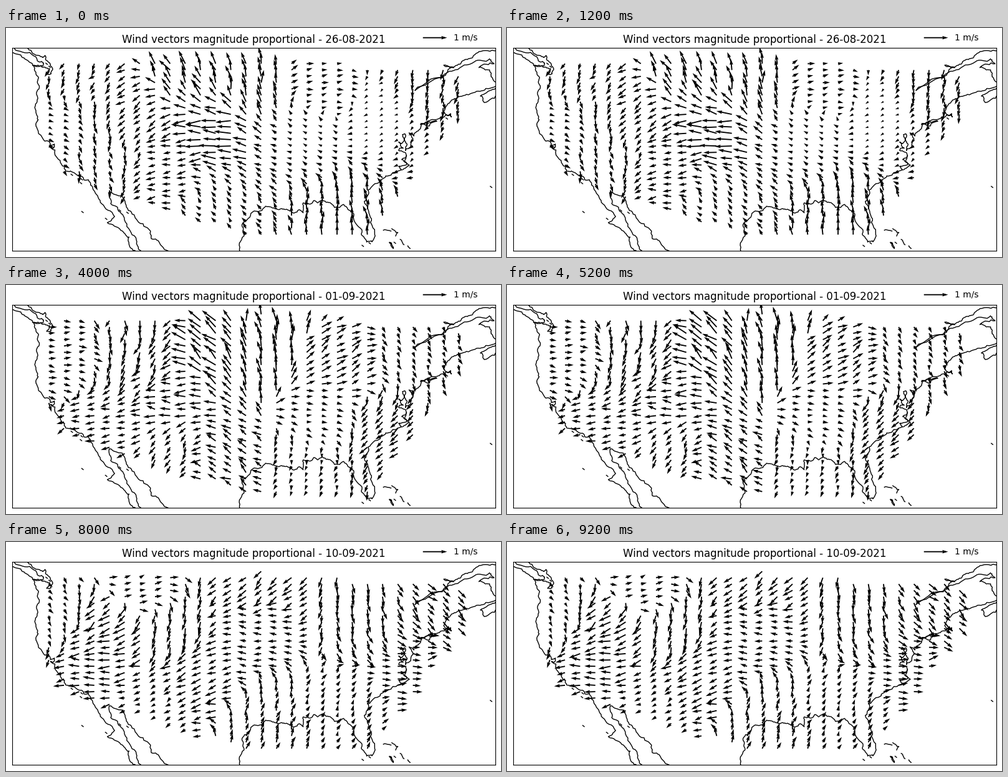
These frames come from a looping animation (794 px wide and 369 px high, 10000 ms). A matplotlib script:

```python
import numpy as np
import matplotlib.pyplot as plt
from matplotlib.animation import FuncAnimation

W, H, DPI = 794, 369, 100
LEFT, BOTTOM, WIDTH, HEIGHT = 10, 10, 775, 327   # map area in pixels
DEG = 12.25                                      # pixels per degree
WEST, SOUTH = 127.5, 24.0                        # lower left corner of the map
DX, DY = 24.33, 10.2                             # arrow spacing in pixels
KEY_PX = WIDTH / 20                              # length of 1 m/s

# Key points of the shores as (degrees west, degrees north)
SHORES = [
    # Vancouver Island
    [(127.6, 50.1), (126.1, 49.4), (125.1, 48.75), (123.5, 48.32), (123.4, 48.7),
     (124.3, 49.3), (125.2, 50.1), (127.6, 50.7)],
    # Strait of Georgia and Puget Sound
    [(125.6, 50.8), (124.7, 49.9), (123.5, 49.42), (123.2, 49.7), (123.1, 49.1),
     (122.5, 48.5), (122.2, 47.95), (122.4, 47.3), (123, 47.2), (122.6, 47.95),
     (123.2, 48.15), (124.7, 48.4)],
    # Pacific
    [(124.7, 48.4), (124.15, 46.95), (123.95, 45.5), (124.15, 44), (124.55, 42.85),
     (124.1, 41.2), (124.4, 40.4), (123.75, 39.2), (122.5, 37.85), (122, 38.05),
     (122.1, 37.5), (122.5, 37.6), (121.9, 36.6), (120.65, 35.1), (120.5, 34.5),
     (119.3, 34.2), (118.4, 33.8), (117.3, 33.0), (116.7, 31.8), (115.8, 30.2),
     (114.1, 28.5), (115.05, 27.7), (113.3, 26.7), (112.2, 25.8), (112.1, 24.5),
     (111.3, 23.9)],
    # Gulf of California
    [(110.55, 23.9), (111.3, 25.7), (112.7, 27.8), (113.2, 28.85), (114.6, 30.2),
     (114.8, 31.75), (113.1, 31.2), (112.3, 29.3), (111.1, 27.95), (109.4, 26.6),
     (109.3, 25.6), (108.1, 24.8), (106.9, 23.9)],
    # Gulf of Mexico
    [(97.7, 23.9), (97.15, 25.95), (97.4, 27.2), (96.4, 28.4), (94.8, 29.3),
     (93.6, 29.75), (92.2, 29.55), (91.2, 29.25), (90.2, 29.1), (89.9, 29.4),
     (89.4, 29), (89.4, 29.8), (89.4, 30.3), (88.2, 30.3), (88.05, 30.6),
     (87.5, 30.3), (86.2, 30.4), (85.3, 29.7), (84.1, 30.1), (82.8, 28.9),
     (82.7, 27.9), (81.8, 26.2), (81.1, 25.15), (80.4, 25.2)],
    # Florida to the Chesapeake
    [(80.4, 25.2), (80.05, 26.8), (80.6, 28.4), (81.4, 30.5), (80.9, 32),
     (79.3, 33.1), (78.6, 33.85), (77.9, 33.95), (76.5, 34.65), (76.9, 35.1),
     (75.8, 35.4), (76.5, 36), (75.95, 36.2), (76, 36.9), (76.9, 37.2),
     (76.3, 37.5), (76.9, 38.3), (76.4, 38.2), (76.4, 39.3), (76.1, 39.4),
     (76.2, 38.6), (75.8, 38), (76, 37.2)],
    [(76.4, 34.65), (75.5, 35.25), (75.9, 36.5)],
    # Delaware to Fundy
    [(76, 37.2), (75.05, 38.5), (75.55, 39.5), (74.9, 39.1), (74, 40.2),
     (74, 40.75), (72.5, 41.27), (71.3, 41.6), (70, 41.6), (70.1, 42.05),
     (70.5, 41.8), (71, 42.3), (70.7, 43), (70, 43.8), (68.9, 44.3),
     (67.1, 44.8), (65.5, 45.35), (64.1, 45.75)],
    # Nova Scotia, St Lawrence, Long Island
    [(64.1, 45.35), (65, 45.05), (66.2, 44.35), (65.7, 43.5), (64.1, 44.5)],
    [(74.75, 45.1), (71.2, 46.85), (69.7, 48.1), (71, 48.42), (69.7, 48.15),
     (68.5, 49), (67.3, 49.35), (66.4, 50.2), (64.1, 50.3)],
    [(74.75, 45.1), (71.2, 46.75), (69.5, 47.8), (67, 48.85), (65, 49.25),
     (64.4, 48.6), (66.4, 48.1), (65, 47.8), (64.8, 46.9), (64.1, 46.2)],
    [(74, 40.6), (71.9, 41.05), (72.6, 40.95), (74, 40.6)],
    # Bahamas
    [(78.9, 26.7), (77.9, 26.6)],
    [(77.8, 26.9), (77, 26.4), (77.3, 25.95)],
    [(78.1, 25.1), (77.6, 24.3), (78.1, 25.1)],
    [(76.7, 25.5), (76.2, 24.8)],
    [(75.7, 24.65), (75.4, 24.3)]]

# Small islands, each a short stroke
ISLETS = [(64.8, 32.4), (118.3, 29.1), (115.2, 28.2), (113.4, 29.3), (112.4, 29),
          (119.7, 34), (118.4, 33.4), (118.5, 32.9), (122.6, 48.2), (123, 48.6),
          (70.6, 41.4), (81.6, 24.65), (80.7, 25), (77.4, 25.05)]

# Wind at a few stations: column, row, heading in degrees, length in pixels
DAYS = {
    "26-08-2021": [
        (1, 2, -115, 13), (0, 11, -25, 9), (4, 15, -80, 13), (6, 10, -140, 15),
        (9, 2, 112, 22), (13, 4, 105, 20), (11, 12, 178, 25), (8, 17, 190, 14),
        (18, 5, 5, 10), (17, 13, 150, 8), (22, 9, -150, 6), (25, 4, -98, 15),
        (11, 24, 125, 11), (19, 25, 90, 17)],
    "29-08-2021": [
        (0, 4, -25, 10), (3, 10, 20, 7), (5, 16, 175, 10), (7, 4, -155, 12),
        (8, 12, 110, 14), (13, 3, -78, 21), (18, 4, -132, 22), (24, 3, 185, 13),
        (22, 11, -140, 9), (13, 14, 145, 11), (17, 21, 118, 22),
        (15, 26, 168, 22), (21, 25, 100, 15), (26, 12, 0, 9)],
    "01-09-2021": [
        (1, 5, 0, 12), (5, 2, -88, 16), (6, 8, -115, 17), (4, 18, 190, 14),
        (8, 21, -120, 14), (8, 14, 175, 18), (11, 5, 140, 25), (14, 6, 100, 22),
        (12, 24, 140, 17), (19, 8, 28, 17), (24, 5, -65, 11), (18, 16, -15, 10),
        (22, 18, -135, 17), (17, 24, -110, 9)],
    "04-09-2021": [
        (1, 4, -110, 10), (0, 15, -50, 10), (3, 11, 125, 8), (7, 7, -92, 21),
        (12, 3, -78, 19), (14, 10, -35, 14), (19, 5, 188, 18), (21, 12, 165, 8),
        (25, 5, -60, 14), (11, 16, 180, 15), (6, 21, -95, 14), (11, 25, 143, 22),
        (18, 22, 120, 8), (22, 22, 65, 10)],
    "10-09-2021": [
        (0, 5, -60, 9), (6, 2, 20, 11), (4, 8, -150, 20), (4, 14, 175, 18),
        (8, 9, -100, 17), (14, 2, -135, 18), (14, 9, 170, 13), (21, 7, -80, 16),
        (25, 6, -45, 17), (24, 15, 0, 15), (10, 17, 205, 17), (7, 22, 210, 10),
        (14, 25, 75, 14), (19, 22, 60, 10)]}

rng = np.random.default_rng(4)


def roughen(points, levels=3, amount=0.11):
    """Break every segment at a randomly displaced midpoint, repeatedly."""
    p = np.array(points, float)
    for _ in range(levels):
        step = np.diff(p, axis=0)
        side = step[:, ::-1] * (-1, 1)
        out = np.empty((2 * len(p) - 1, 2))
        out[::2] = p
        out[1::2] = p[:-1] + step / 2 + side * rng.normal(0, amount, (len(step), 1))
        p = out
    return p


def to_px(points):
    lon, lat = np.array(points).T
    return (WEST - lon) * DEG, (lat - SOUTH) * DEG


def grid():
    """Columns and rows of the arrows inside the country's outline."""
    c = np.arange(28)
    first = np.interp(c, [0, 1, 13, 14, 15, 19, 20, 26, 27], [2, 1, 1, 0, 1, 1, 2, 2, 3])
    last = np.interp(c, [0, 1, 9, 13, 21, 22, 27], [14, 18, 25, 28, 28, 25, 9])
    col, row = np.meshgrid(c, np.arange(29), indexing="ij")
    inside = (row >= first[:, None]) & (row <= last[:, None].round())
    return col[inside], row[inside]


def blow(stations):
    """Blend heading and length of the stations by distance, with some gusts."""
    c, r, heading, length = np.array(stations, float).T
    d2 = (col[:, None] - c) ** 2 + ((row[:, None] - r) * DY / DX) ** 2
    weight = (d2 + 0.8) ** -2
    weight /= weight.sum(axis=1, keepdims=True)
    angle = np.angle(weight @ np.exp(1j * np.radians(heading)))
    angle += rng.normal(0, 0.18, len(col))
    speed = weight @ length * rng.uniform(0.8, 1.15, len(col)) / KEY_PX
    return speed * np.cos(angle), speed * np.sin(angle)


fig = plt.figure(figsize=(W / DPI, H / DPI), dpi=DPI, facecolor="white")
ax = fig.add_axes([LEFT / W, BOTTOM / H, WIDTH / W, HEIGHT / H])
ax.set(xlim=(0, WIDTH), ylim=(0, HEIGHT), xticks=[], yticks=[])

for shore in SHORES:
    ax.plot(*to_px(roughen(shore)), color="black", lw=1)
for lon, lat in ISLETS:
    stroke = [(lon + 0.1, lat + 0.08), (lon - 0.1, lat - 0.08)]
    ax.plot(*to_px(stroke), color="black", lw=1)

col, row = grid()
fields = [(day, *blow(stations)) for day, stations in DAYS.items()]
wind = ax.quiver(58.7 + DX * col, HEIGHT - 15.3 - DY * row, *fields[0][1:],
                 scale=20, zorder=3)
ax.quiverkey(wind, 0.9, 1.05, 1, "1 m/s", labelpos="E")
title = ax.set_title("")


def update(n):
    day, u, v = fields[n]
    wind.set_UVC(u, v)
    title.set_text(f"Wind vectors magnitude proportional - {day}")
    return wind, title


anim = FuncAnimation(fig, update, frames=len(fields), interval=2000,
                     repeat=True, repeat_delay=0)
plt.show()
```
